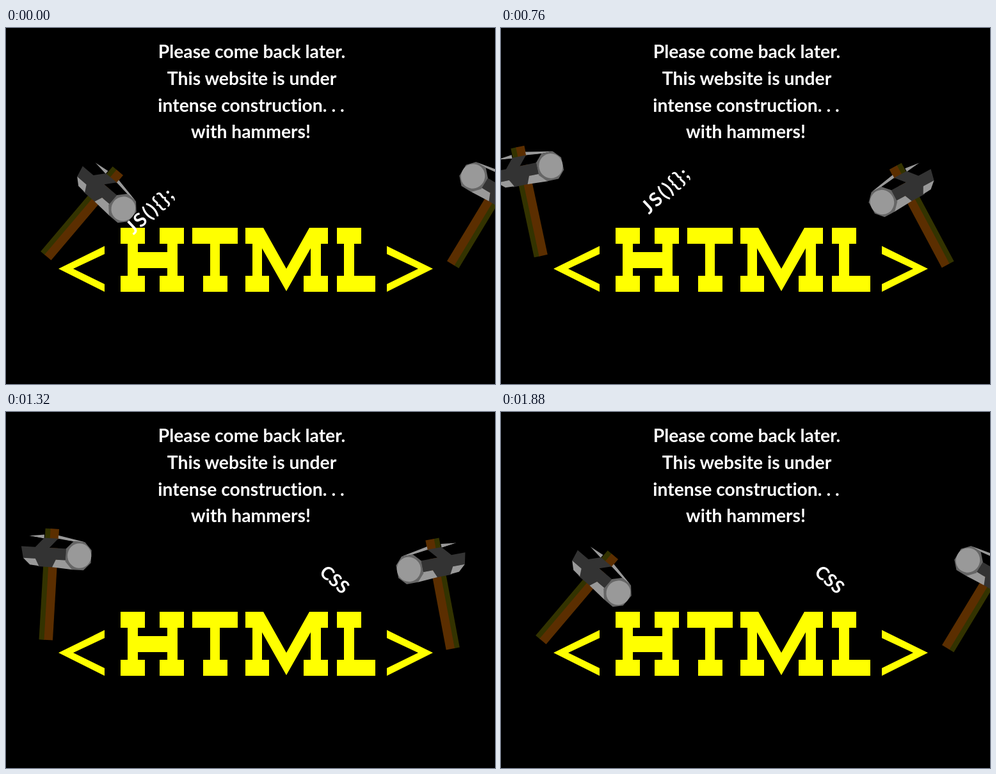
Recreate the animation shown at these times as an HTML page. Size 764 px wide and 556 px high, loop 1.92 s.

```html
<!DOCTYPE html>
<html lang="en">
<head>
<meta charset="utf-8">
<title>Under construction</title>
<style>
  html, body { margin: 0; width: 100%; height: 100%; overflow: hidden; background: #000; }
  svg { display: block; width: 764px; height: 556px; }
  text {
    font-family: Lato, "Open Sans", sans-serif; font-weight: 700; font-size: 28.3px;
    font-variant-ligatures: none; fill: #fff; text-anchor: middle;
  }
  #js { font-size: 30px; letter-spacing: 2.8px; }
</style>
</head>
<body>
<svg viewBox="0 0 764 556">
  <defs>
    <!-- Pivot at the origin, handle pointing up, striking face on the right -->
    <g id="hammer">
      <path fill="#333300" d="M-11 0V-174H-2V0z"/>
      <path fill="#5b2e00" d="M-3 0V-174H10.500V0z"/>
      <path fill="#999" d="M-36-161L-12-164V-158zM10-164L52-156H34L10-159z"/>
      <path fill="#000" d="M-36-161L-12-158H10L34-156L23-144L-47-144z"/>
      <path fill="#333" d="M-47-144H-25L-12-159H10L-3-144H23V-126L8-126L5-114H-20L-24-126H-43z"/>
      <path fill="#999" d="M-43-126H-24L-18-115L-32-116zM8-126H23L35-112L3-114z"/>
      <path fill="#666" d="M34-156H52L63-144V-124L52-112H34L23-124V-144z"/>
      <ellipse fill="#999" cx="44.5" cy="-134.3" rx="18.6" ry="19.3"/>
    </g>
  </defs>

  <text x="384" y="47">Please come back later.</text>
  <text x="384" y="89">This website is under</text>
  <text x="383" y="131">intense construction. . .</text>
  <text x="382.500" y="172">with hammers!</text>

  <g fill="#ff0" role="img" aria-label="&lt;HTML&gt;">
    <path d="M154 340.500V353L105 376L154 400V412L82 376z"/>
    <path d="M179 312H217V337H206V350H252V337H240V312H278V337H268V387H278V412H240V387H252V375H206V387H217V412H179V387H190V337H179z"/>
    <path d="M291 312H362V337H334V387H346V412H308V387H319V337H291z"/>
    <path d="M374 312H402L438 376L474 312H503V337H492V387H503V412H465V387H476V344L438 411L400 344V387H411V412H374V387H385V337H374z"/>
    <path d="M517 312H555V337H544V387H577V412H517V387H528V337H517z"/>
    <path d="M595 340.500L667 376L595 412V400L644 376L595 353z"/>
  </g>

  <use href="#hammer" id="left"/>
  <use href="#hammer" id="right"/>
  <text id="js" dy=".36em">JS(){};</text>
  <text id="css" dy=".36em">CSS</text>
</svg>
<script>
  const LOOP = 1920, STEP = 40, TURN = 920, FLIGHT = 200;
  const part = id => document.getElementById(id);
  const [left, right, js, css] = ["left", "right", "js", "css"].map(part);
  const lerp = (a, b, k) => a + (b - a) * k;

  const place = (el, x, y, angle, flip = 1) =>
    el.setAttribute("transform", `translate(${x} ${y}) rotate(${angle}) scale(${flip} 1)`);

  // A word is knocked from (dx, dy) away to its resting place.
  function knock(word, t, x, y, dx, dy, angle) {
    const rest = 1 - Math.min(t / FLIGHT, 1);
    place(word, x + dx * rest, y + dy * rest, angle);
  }

  function draw(t) {
    const swing = t <= TURN ? t / TURN : 1 - (t - TURN) / (LOOP - STEP - TURN);
    place(left, 62.5, 356, lerp(40.3, -23.1, swing));
    place(right, 698, 369.5, lerp(31.2, -40.6, swing), -1);

    const first = t < TURN;
    js.style.display = first ? "" : "none";
    css.style.display = first ? "none" : "";
    if (first) knock(js, t, 257.5, 252.5, -32, 32, -43);
    else knock(css, t - TURN, 513.5, 261.5, 25, 27, 42);
  }

  const start = performance.now();
  function tick() {
    const t = (performance.now() - start) % LOOP;
    draw(Math.floor(t / STEP) * STEP);
    requestAnimationFrame(tick);
  }
  draw(0);
  requestAnimationFrame(tick);
</script>
</body>
</html>
```
